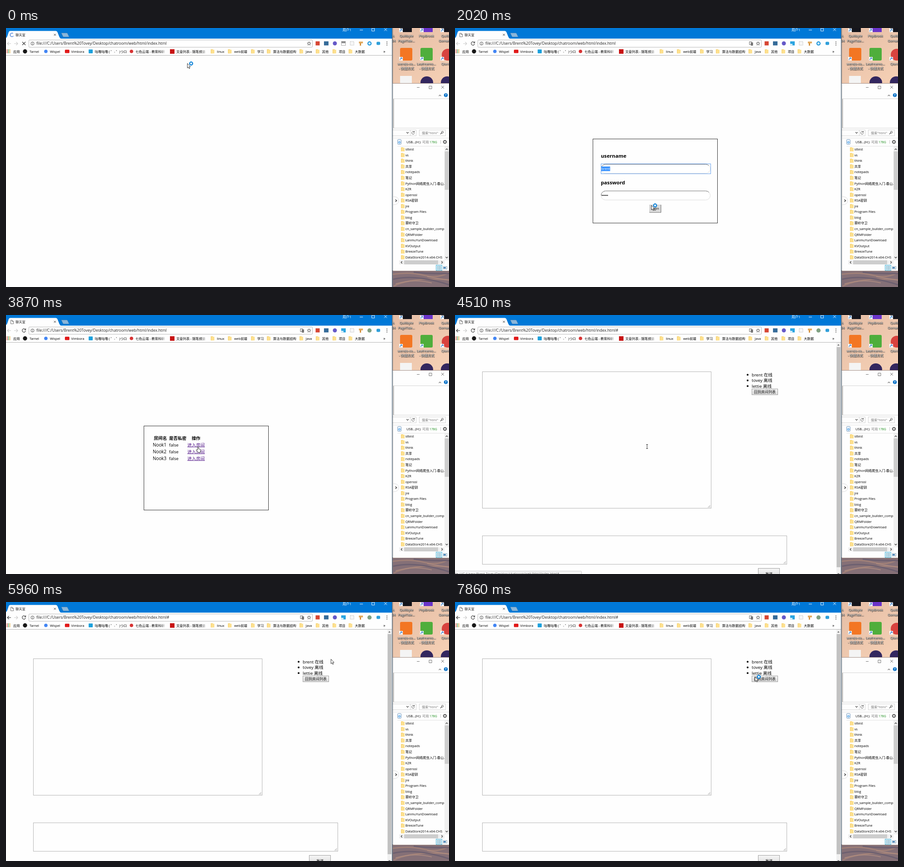
An HTML page that plays this animation: 978x573 px, repeating every 8 s.

```html
<!DOCTYPE html>
<html>
<head>
<meta charset="utf-8">
<style>
html, body { margin: 0; width: 100%; height: 100%; overflow: hidden; background: #fefefe; }
svg { display: block; font-family: "Open Sans", "Noto Sans CJK SC", "Noto Sans CJK", sans-serif; }
.desk { text-shadow: .6px .6px 1px #000, 0 0 1.5px #000; }
.bold { font-weight: 700; }
</style>
</head>
<body>
<svg id="stage" width="978" height="573" viewBox="0 0 978 573"></svg>
<script>
const text = (x, y, s, size = 7.3, fill = '#000', extra = '') =>
  `<text x="${x}" y="${y}" font-size="${size}" fill="${fill}" ${extra}>${s}</text>`;
const rect = (x, y, w, h, fill, extra = '') =>
  `<rect x="${x}" y="${y}" width="${w}" height="${h}" fill="${fill}" ${extra}/>`;
const frame = (x, y, w, h, stroke, fill = 'none', extra = '') =>
  rect(x + .5, y + .5, w - 1, h - 1, fill, `stroke="${stroke}" ${extra}`);
const dot = (x, y, r, fill, extra = '') => `<circle cx="${x}" cy="${y}" r="${r}" fill="${fill}" ${extra}/>`;
const line = (d, stroke, w = 1, fill = 'none', extra = '') =>
  `<path d="${d}" stroke="${stroke}" stroke-width="${w}" fill="${fill}" ${extra}/>`;
const group = (id, s, hidden = true) => `<g id="${id}" ${hidden ? 'display="none"' : ''}>${s}</g>`;
const cross = (x, y, r, color, w = 1) =>
  line(`M${x - r} ${y - r}l${2 * r} ${2 * r}m0 ${-2 * r}l${-2 * r} ${2 * r}`, color, w);
const folder = (x, y) => rect(x - 4, y - 4.5, 5, 9, '#f4cf6c') + rect(x - 3, y - 3.5, 7, 8, '#fde08f');
const chevron = (x, y, dx, dy, color = '#444', w = 1.2) => dx
  ? line(`M${x - dx} ${y - 2.5}L${x + dx / 2} ${y}L${x - dx} ${y + 2.5}`, color, w)
  : line(`M${x - 2.5} ${y - dy}L${x} ${y + dy / 2}L${x + 2.5} ${y - dy}`, color, w);

const home = 'file:///C:/Users/Brent%20Tovey/Desktop/chatroom/web/html/index.html';

function desktop() {
  const label = (x, y, s) => text(x, y, s, 7.3, '#fff', 'class="desk" text-anchor="middle"');
  let s = rect(852, 0, 126, 123, 'url(#sand)') + rect(852, 536, 126, 37, '#857077');
  s += line('M852 545q40 -6 70 2t56 -6M856 571q40 -20 122 -14', '#a08078', 3);
  s += line('M854 556q50 -12 124 12M900 540q30 4 78 3', '#6d6070', 3);
  s += line('M860 566q40 -12 80 -2M930 550l48 8', '#b08d80', 1.5);
  s += rect(870, 0, 26, 9, '#15151c') + rect(916, 0, 26, 9, '#6a34c9') + rect(961, 0, 17, 9, '#15151c');
  s += label(855, 20, 'A') + label(884, 20, 'Quillbyte') + label(856, 31, '34') + label(884, 31, 'PageTide...');
  s += label(928, 20, 'PhpBrook') + label(976, 20, 'Quillbyte') + label(971, 31, 'Gomarsh');
  s += rect(870, 44, 27, 28, '#f37623', 'rx="3"') + rect(915, 44, 27, 28, '#4fae3c', 'rx="3"') + dot(975, 59, 13, '#d8433f');
  for (const x of [868, 914, 959])
    s += [9, 72].map(y => rect(x, y - 8, 8, 8, '#fff') + line(`M${x + 2} ${y - 1}q0 -4 4 -5m-3 0h3v3`, '#1769c0', 1.2)).join('');
  s += label(884, 82, 'wendo-co...') + label(928, 82, 'Leafmemo...') + label(972, 82, 'Qterm');
  s += label(884, 92, '- 快捷方式') + label(929, 92, '- 快捷方式');
  return s + rect(870, 106, 26, 17, '#f4f4f4') + dot(929, 121, 14, '#33275f') + dot(974, 121, 14, '#33275f');
}

function explorer() {
  const names = ['sttest', 'vs', 'think', '共享', 'notepads', '笔记', 'Python网络爬虫入门-春山.', 'KZR', 'openssl',
    'RSA密钥', 'jre', 'Program Files', 'blog', '雾岭守卫', 'cn_sample_builder_comp..', 'QRMFolder',
    'LanmuYunDownload', 'KVOutput', 'BreezeTune', 'DataStore2014-x64-CHS'];
  let s = rect(854, 122, 124, 416, '#fefefe') + line('M854 122.5H978M854 537.5H978', '#a58f86');
  s += line('M907 131.5h6M934 128.5h6v6h-6z', '#777') + cross(964, 131, 3, '#777');
  s += chevron(958, 149, 0, -1.6, '#777') + dot(971, 148.5, 4.3, '#0a72c8') + text(969.3, 151.2, '?', 7, '#fff', 'class="bold"');
  s += line('M855 156.5H978M855 221.5H978', '#d5d5d5') + line('M855.7 157V221', '#aaa', 1.4);
  s += frame(850, 225, 56, 14, '#d5d5d5') + line('M892.5 225v13', '#d5d5d5') + chevron(886.5, 232, 0, 1.7);
  s += line('M901 230a3 3 0 1 0 .7 2.5M901.5 228v2.5h-2.5', '#555');
  s += frame(912, 225, 59, 14, '#d5d5d5') + text(918, 234.5, '搜索"html"', 7.3, '#777');
  s += dot(963.5, 230.5, 2, 'none', 'stroke="#444"') + line('M962 232l-3 3', '#444', 1.2);
  s += line('M855 243.5H978M864 261.5H978', '#e2e2e2');
  s += frame(864, 246, 9, 12, '#7b9cbd', '#eaf3fb', 'rx="2"') + dot(868.5, 253, 2, '#d5ecff', 'stroke="#2b8de0"');
  s += text(884, 255, 'USB...(H:)') + text(919, 255, '可用', 7.3, '#777') + text(935, 255, '178G', 6.8, '#168a16');
  s += line('M959.5 248v8', '#ccc') + dot(969, 252, 2.8, 'none', 'stroke="#555" stroke-width="1.7"');
  s += dot(969, 252, 4, 'none', 'stroke="#555" stroke-dasharray="1.6 1.54"');
  names.forEach((n, i) => { const y = 268.5 + 12.56 * i; s += folder(876, y) + text(881.7, y + 2.7, n); });
  s += line('M855 373q12 0 12 9t-12 9', '#ddd', 1, '#fff') + chevron(861.5, 382, 2, 0, '#333', 1.4);
  s += rect(968, 262, 10, 252, '#f0f0f0') + rect(968.5, 273, 9, 85, '#cdcdcd');
  s += chevron(973, 268, 0, -1.6) + chevron(973, 508, 0, 1.6);
  s += rect(868, 514, 100, 9, '#f0f0f0') + rect(879, 514, 75, 9, '#cdcdcd') + chevron(873, 518.5, -1.6, 0) + chevron(963, 518.5, 1.6, 0);
  s += frame(949, 524, 14, 13, '#58b7d8', '#d2eef8') + line('M952 527.5h3m1 0h4M952 530.5h3m1 0h4M952 533.5h3m1 0h4', '#5b8ba5');
  return s + frame(965, 527, 9, 7, '#9ab3c6', '#eee') + rect(966, 529, 5, 3, '#3c7eb5');
}

function browser() {
  let s = rect(0, 0, 852, 573, '#fefefe') + rect(0, 0, 852, 23.5, '#0078d7');
  s += rect(852, 0, 1, 573, '#47637c') + rect(853, 0, 2, 573, '#777', 'opacity=".4"');
  s += line('M0 24V22q2 -1 3 -4l3 -9q1 -2.5 3 -2.5H110q2.5 0 3.5 2.5l4 10q1.5 4 4 5z', 'none', 0, '#fefefe');
  s += text(21, 17.7, '聊天室', 7.3, '#222') + cross(108, 15, 2.2, '#555');
  s += line('M122 11h12q1.5 0 2 1.5l3.5 7.3H128q-2 0 -2.5 -1.5z', '#3e78a8', .6, '#8ab6da');
  s += text(743, 7, '用户1', 7.5, '#fff') + line('M781 4.5h7M807.5 .8h6v6h-6z', '#fff', .9) + cross(838, 3.5, 3, '#fff', .9);
  s += frame(50, 26, 627, 17, '#bbb', '#fff', 'rx="1.5"');
  s += dot(58.5, 34.3, 3.5, 'none', 'stroke="#555"') + line('M58.5 33.5v3M58.5 31.8v1', '#555');
  s += line('M18 34.5h8m-3.5 -3.5l3.5 3.5l-3.5 3.5', '#ccc', 1.2);
  s += line('M669 30.3l1.1 2.7l2.9 .2l-2.2 1.9l.7 2.8l-2.5 -1.5l-2.5 1.5l.7 -2.8l-2.2 -1.9l2.9 -.2z', '#444', .9);
  s += rect(683.5, 29.5, 9, 9, '#d64532') + rect(702, 29.5, 10, 9, '#356b99') + dot(726, 34, 4.5, '#6558c7');
  s += frame(759.5, 29.5, 9, 9, '#bbb', '#f7f7f7', 'stroke-dasharray="2 1"') + rect(779, 30, 9, 4, '#e2ad64') + rect(781, 33, 3, 6, '#d69442');
  s += rect(818, 30.5, 8, 7, '#2f9fda', 'rx="2"') + [30.8, 34.3, 37.8].map(y => dot(841, y, 1, '#555')).join('');
  // bookmarks bar
  for (let i = 0; i < 9; i++) s += rect(1.5 + i % 3 * 3, 47.5 + (i / 3 | 0) * 3, 2, 2, ['#e04a3a', '#45a058', '#e5a93a'][i % 3]);
  s += dot(42, 51.7, 4.7, '#181818') + dot(88, 51.7, 3.8, '#4285f4') + rect(130, 48, 10, 7.5, '#e11b1b', 'rx="1.5"');
  s += rect(182.5, 47.5, 9, 8.5, '#1ba0dc', 'rx="1"') + dot(277, 51.7, 3.8, '#d73333') + rect(362, 47, 10, 10, '#c81414');
  [[16, '应用'], [52, 'Tarnel'], [97, 'Wispel'], [144, 'Vimbora'], [196, '咕噜咕噜 ( ゜- ゜)つロ'], [286, '七色云端 - 教育科研'], [376, '文章列表 - 随笔频道']]
    .forEach(([x, n]) => s += text(x, 54.6, n));
  s += rect(342, 46, 11, 11, 'url(#fade)') + rect(431, 46, 11, 11, 'url(#fade)');
  [[456, 'linux'], [494, 'web前端'], [545, '学习'], [580, '算法与数据结构'], [652, 'Java'], [688, '其他'], [725, '项目'], [760.5, '大数据']]
    .forEach(([x, n]) => s += folder(x, 51.7) + text(x + 9.7, 54.6, n));
  return s + text(833, 54.5, '»', 9) + line('M0 60.5H852', '#b5b5b5');
}

function login() {
  const field = y => frame(322, y, 242, 21, '#ddd', '#fff', 'rx="10"') +
    line(`M322.5 ${y + 10.5}a10 10 0 0 1 10 -10H553.5a10 10 0 0 1 7 3`, '#777');
  return frame(304, 245, 276, 187, '#333') +
    text(322, 286.7, 'username', 11.2, '#000', 'class="bold"') + text(322, 345.7, 'password', 11.2, '#000', 'class="bold"') +
    field(301) + field(360) + text(323, 314, 'brent', 7.7) +
    [0, 1, 2, 3, 4].map(i => dot(325 + 2.9 * i, 370.3, 1.15, '#000')).join('') +
    rect(429, 391, 26, 17.5, '#ddd') + line('M429 391.5h26M429.5 391v17', '#c8c8c8') + line('M429 408h26M454.6 391v17', '#777', 1.2) +
    text(433, 402, 'login', 7.7) +
    group('focus', frame(322, 300, 243, 23, '#6ba4ee')) +
    group('selected', rect(323, 306.5, 19.5, 10, '#3390ff') + text(323, 314, 'brent', 7.7, '#fff')) +
    group('pressed', frame(428, 390, 28, 19, '#6ba4ee'));
}

function rooms() {
  let s = frame(304, 245, 276, 187, '#333');
  [[326.5, '房间名'], [360, '是否私密'], [410, '操作']].forEach(([x, n]) => s += text(x, 275.5, n, 9.6, '#000', 'class="bold"'));
  for (let i = 1; i < 4; i++) {
    const y = 275.5 + 15 * i;
    s += text(324, y, 'Nook' + i, 9.9) + text(360, y, 'false', 9.6);
    s += text(400.5, y, '进入房间', 9.6, '#551a8b', 'text-decoration="underline"');
  }
  return s;
}

function chat() {
  const area = (w, y, h) => frame(60, y, w, h, '#b6b6b6', '#fefefe') +
    line(`M${52.5 + w} ${y + h - 2}l5 -5m-2 5l2 -2`, '#777', .8);
  const button = (x, y, w, h) => frame(x, y, w, h, '#a0a0a0', 'url(#button)');
  let s = area(506, 125, 303) + area(673, 488, 64);
  ['brent 在线', 'tovey 离线', 'lettie 离线'].forEach((n, i) =>
    s += dot(646, 132.3 + 12.5 * i, 2, '#000') + text(655, 135.5 + 12.5 * i, n, 9.6));
  s += button(655, 163, 58, 14) + text(660, 173.2, '回到房间列表', 8);
  s += button(669, 560, 48, 20) + text(685, 576, '发送', 8);
  s += rect(842, 61, 10, 512, '#f1f1f1') + rect(842.5, 71, 8.5, 487, '#c1c1c1');
  return s + line('M844 67.5l2.5 -3l2.5 3zM844 571.5h5l-2.5 3z', 'none', 0, '#666') +
    group('status', line('M-1 566.5H277.5q2 0 2 2V574', '#ccc', 1, '#f4f4f4') +
      text(-3, 575, home.replace('%20', ' ') + '#', 7.2, '#555'));
}

const stage = document.getElementById('stage');
stage.innerHTML = `<defs>
  <linearGradient id="sand" x2=".8" y2="1"><stop stop-color="#e5bda5"/><stop offset="1" stop-color="#f4cfb4"/></linearGradient>
  <linearGradient id="fade"><stop stop-color="#fefefe" stop-opacity="0"/><stop offset="1" stop-color="#fefefe"/></linearGradient>
  <linearGradient id="button" x2="0" y2="1"><stop stop-color="#f6f6f6"/><stop offset="1" stop-color="#ddd"/></linearGradient>
  </defs>` + desktop() + explorer() + browser() +
  group('loading', line('M16.5 17.5A4 4 0 1 1 15.5 12', '#3b78d8', 1.3, 'none', 'id="spinner"') + cross(39.5, 34.3, 3.5, '#444', 1.3) +
    rect(740.5, 29.5, 9.5, 4, '#888') + frame(740, 29, 10, 10, '#aaa')) +
  group('loaded', line('M10.5 11.5h3.5l2.5 2.5v5.5h-6zM13.5 11.5v3h3', '#555', .8) +
    line('M42.5 31.8a3.8 3.8 0 1 0 .8 3.2M43.5 29.8v3h-3', '#444', 1.2) +
    frame(649.5, 30, 6, 7, '#666') + rect(653, 32, 5, 7, '#777') + rect(740, 29.5, 10, 9, '#2aa4e0') + rect(740, 35, 5, 3.5, '#d4eefa')) +
  group('online', dot(802.5, 34.2, 3.5, '#fff', 'stroke="#1f97dc" stroke-width="2.3"')) +
  group('offline', dot(802.5, 34.2, 4.6, '#7fa182')) +
  line('M11 34.5H3m3.5 -3.5l-3.5 3.5l3.5 3.5', '#ccc', 1.2, 'none', 'id="back"') +
  text(67, 37.2, home, 8.6, '#222', 'id="url"') +
  group('login', login()) + group('rooms', rooms()) + group('chat', chat()) +
  group('cursor',
    group('arrow', line('M.4 .4V10.5L2.7 8.4L4.3 12L5.9 11.3L4.3 7.8H7.3z', '#111', .8, '#fff')) +
    group('busy', dot(8.7, .6, 3.4, '#e8f5fd', 'stroke="#1786d8" stroke-width="2.3"')) +
    group('beam', line('M-2 -4.5h4M0 -4.5v9M-2 4.5h4', '#222', .9)) +
    group('hand', line('M-1 1q1 -1.5 2 0v4l4 1q1 .5 1 2l-1 5h-5l-4 -5q0 -1.5 1.5 -1l1.5 1z', '#111', .8, '#fff')), false);

const el = id => document.getElementById(id);
// cursor stops: time, x, y and, where it changes, the pointer kind
const stops = [
  [0, 400, 78, 'busy'], [120, 402, 95], [270, 408, 140], [390, 414, 190], [510, 421, 245], [660, 427, 285], [780, 429, 298],
  [930, 414, 303], [1060, 385, 308], [1200, 350, 310], [1350, 342, 310], [1470, 322, 310], [1620, 305, 311], [1770, 365, 345],
  [2020, 433, 392], [2260, 438, 396], [2800, 438, 396, 'arrow'], [3210, 438, 396, 'busy'],
  [3480, 430, 350, 'arrow'], [3600, 413, 280], [3740, 412, 238], [3870, 424, 291, 'hand'],
  [4270, 424, 291, 'beam'], [4540, 422, 283], [4960, 430, 273], [5120, 452, 250], [5270, 500, 210],
  [5410, 575, 162, 'arrow'], [5550, 642, 130], [5690, 690, 117], [5820, 712, 116], [5960, 717, 126], [6240, 707, 126],
  [6510, 703, 128], [6650, 699, 132], [6780, 699, 130],
  [7210, 698, 128, 'busy'], [7340, 688, 138], [7470, 675, 151], [7600, 665, 160], [7730, 660, 164], [7860, 662, 165]];

function draw() {
  const t = performance.now() % 8000;
  const show = (id, on) => el(id).setAttribute('display', on ? 'inline' : 'none');
  const within = (a, b) => t >= a && t < b;
  let x, y, kind;
  for (const [at, px, py, k] of stops) if (t >= at) { x = px; y = py; kind = k || kind; }
  el('cursor').setAttribute('transform', `translate(${x} ${y})`);
  show('arrow', kind === 'arrow' || kind === 'busy');
  for (const k of ['busy', 'beam', 'hand']) show(k, kind === k);
  show('loading', t < 390);
  show('loaded', t >= 390);
  el('spinner').setAttribute('transform', `rotate(${Math.floor(t / 130) * 60} 13 15)`);
  show('online', t < 2140);
  show('offline', t >= 2140);
  show('login', within(390, 3210));
  show('focus', within(1350, 2390));
  show('selected', within(1620, 2390));
  show('pressed', within(2390, 3210));
  show('rooms', within(3210, 4270));
  show('chat', t >= 4270);
  show('status', t < 5270);
  el('back').setAttribute('stroke', t < 4270 ? '#ccc' : '#444');
  el('url').textContent = home + (t < 4270 ? '' : '#');
  requestAnimationFrame(draw);
}
draw();
</script>
</body>
</html>
```
